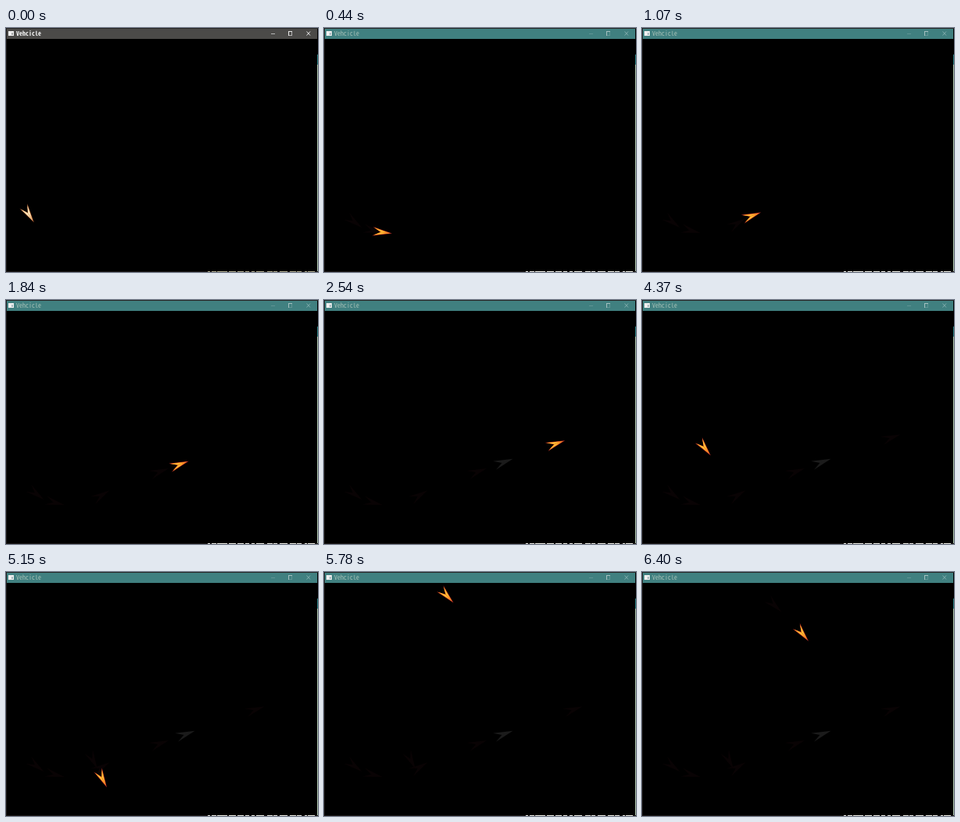
These frames come from a looping animation (399x313 px, 6.45 s). An HTML page with a canvas:

```html
<!DOCTYPE html>
<html lang="en">
<head>
<meta charset="utf-8">
<title>Vehcicle</title>
<style>
  html, body { margin: 0; width: 399px; height: 313px; overflow: hidden; background: #000; }
  canvas { display: block; }
</style>
</head>
<body>
<canvas id="stage" width="399" height="313"></canvas>
<script>
const ctx = document.getElementById('stage').getContext('2d');
const W = 399, H = 313, LOOP = 6450, STEP = 70;
const VIEW = { x: 1, y: 14, w: 397, h: 298 };

// Key points of the flight: time, x, y on an endless plane.
// The first and last only set the direction at the ends.
const PATH = [
  [-300, 24, 206], [0, 28, 238], [300, 57, 258], [650, 98, 260.5],
  [1070, 139.2, 240.5], [3450, 392, 150.5], [3750, 424, 144.5],
  [4370, 476, 188.6], [5150, 519.7, 265], [5570, 538.8, 310.8],
  [6400, 601, 376], [6900, 631, 425]
];

// Moments at which the vehicle leaves a faint trace
const TRACES = [120, 340, 880, 1600, 2750, 4910, 5930];
const STRONG_TRACE = 1915;

const mod = (a, n) => ((a % n) + n) % n;

function rect(color, x, y, w, h) {
  ctx.fillStyle = color;
  ctx.fillRect(x, y, w, h);
}

function seeded(seed) {
  return () => (seed = (seed * 16807) % 2147483647) / 2147483647;
}

function slope(i, c) {
  const a = PATH[i - 1], b = PATH[i + 1];
  return (b[c] - a[c]) / (b[0] - a[0]);
}

// Smooth curve through the key points
function pointAt(t) {
  let i = 1;
  while (i < PATH.length - 3 && PATH[i + 1][0] <= t) i++;
  const a = PATH[i], b = PATH[i + 1], d = b[0] - a[0];
  const u = (t - a[0]) / d, v = 1 - u;
  return [1, 2].map(c => a[c] * (1 + 2 * u) * v * v + b[c] * u * u * (3 - 2 * u)
    + d * u * v * (slope(i, c) * v - slope(i + 1, c) * u));
}

function poly(color, points) {
  ctx.beginPath();
  points.forEach(p => ctx.lineTo(p[0], p[1]));
  ctx.closePath();
  ctx.fillStyle = color;
  ctx.fill();
}

// Dart pointing along its flight; trace mode has an edge colour only
function vehicle(t, edge, fill, core) {
  const [x, y] = pointAt(t), [nx, ny] = pointAt(t + 1);
  ctx.save();
  ctx.translate(VIEW.x + mod(x - VIEW.x, VIEW.w) + 0.8, VIEW.y + mod(y - VIEW.y, VIEW.h) + 0.6);
  ctx.rotate(Math.atan2(ny - y, nx - x));
  poly(edge, [[13, 0], [-12, -5.8], [-2, 0], [-12, 5.8]]);
  if (fill) {
    for (const side of [-1, 1]) {
      poly(fill, [[10.5, 0], [-10.5, 5 * side], [-1.5, 0]]);
      poly(core, [[5, 0.5 * side], [-9, 4.1 * side], [-1, 0.7 * side]]);
    }
  }
  ctx.restore();
}

function titleBar(fresh) {
  rect(fresh ? '#4b4a48' : '#408080', 1, 1, 397, 13);

  rect('#f0f0f0', 3, 4, 7, 6);
  rect(fresh ? '#a4a6a6' : '#a8bcc0', 7, 6, 2, 3);

  ctx.fillStyle = fresh ? '#f8f8f8' : '#a9c2b8';
  ctx.font = (fresh ? 'bold ' : '') +
    '8px "Noto Sans Mono CJK JP", "Noto Sans CJK JP", Roboto, sans-serif';
  ctx.fillText('Vehcicle', 13, 10);

  const dim = fresh ? '#b4b4b4' : '#5f9494';
  const ink = fresh ? '#e4e4e4' : '#a4c0c0';
  rect(dim, 339, 7, 5, 1);
  rect(dim, 361, 9, 5, 1);
  rect(dim, 365, 4, 1, 6);
  rect(ink, 361, 4, 5, 1);
  rect(ink, 361, 4, 1, 6);
  ctx.strokeStyle = fresh ? ink : '#7fabab';
  ctx.beginPath();
  ctx.moveTo(384.5, 4.5); ctx.lineTo(389, 9.5);
  ctx.moveTo(389, 4.5); ctx.lineTo(384.5, 9.5);
  ctx.stroke();
}

function border(fresh) {
  rect('#262626', 0, 0, W, 1);
  rect('#1e1c1c', 0, 0, 1, H);
  rect('#1c1818', 0, 312, W, 1);
  rect('#2d8387', 398, 34, 1, 13);
  rect('#b4ccb4', 398, 47, 1, 265);

  // Broken light line along the lower right edge
  const rand = seeded(11);
  for (let x = 258; x < 397;) {
    const w = 3 + Math.floor(rand() * 12);
    rect(fresh ? '#b4b094' : '#f4f4ec', x, 312, Math.min(w, 398 - x), 1);
    x += w + 1 + Math.floor(rand() * 4);
  }
}

function draw(t) {
  const fresh = t < STEP;
  const lag = t < 100 ? 0 : t < 4100 ? 20 : 30;
  const now = Math.floor((t - lag) / STEP) * STEP + lag;

  rect('#000', 0, 0, W, H);
  border(fresh);
  titleBar(fresh);

  ctx.save();
  ctx.beginPath();
  ctx.rect(VIEW.x, VIEW.y, VIEW.w, VIEW.h);
  ctx.clip();
  TRACES.filter(s => s <= now).forEach(s => vehicle(s, '#090304'));
  if (now >= STRONG_TRACE) vehicle(STRONG_TRACE, '#1b1b1b');
  if (fresh) vehicle(now, '#a8562c', '#f3c68c', '#fff0cf');
  else vehicle(now, '#c2302a', '#ff9a24', '#ffd040');
  ctx.restore();
}

function tick() {
  draw(performance.now() % LOOP);
  requestAnimationFrame(tick);
}
tick();
</script>
</body>
</html>
```
